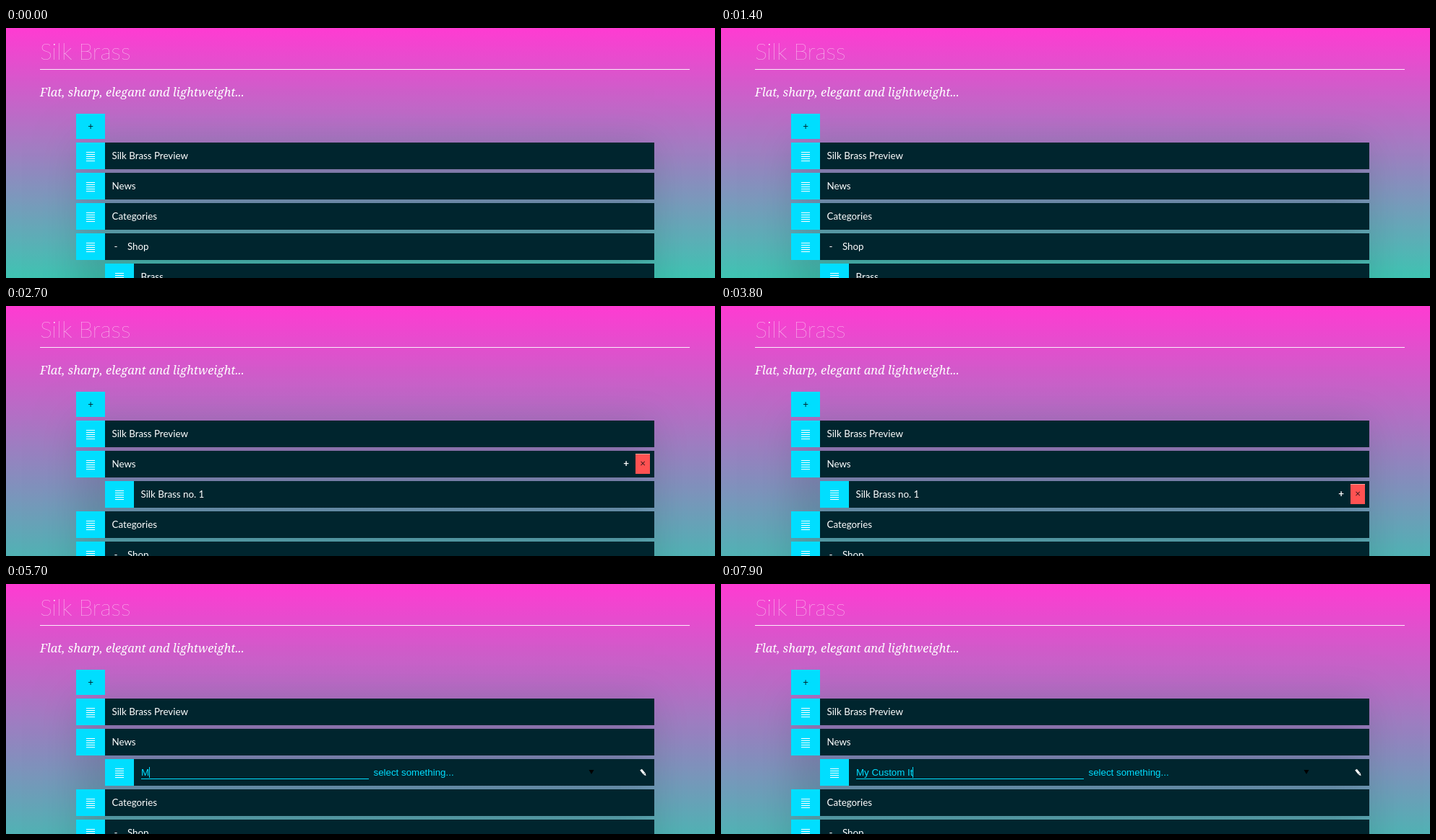
Recreate the animation shown at these times as an HTML page with a canvas. Size 981 px wide and 347 px high, loop 8 s.

```html
<!DOCTYPE html>
<html lang="en">
<head>
<meta charset="utf-8">
<title>Menu editor</title>
<style>
  html, body { margin: 0; width: 100%; height: 100%; overflow: hidden; background: #ff3bd2; }
  canvas { display: block; }
</style>
</head>
<body>
<canvas id="stage" width="981" height="347"></canvas>
<script>
const ctx = document.getElementById('stage').getContext('2d');
const W = 981, H = 347, LOOP = 8000;
const CYAN = '#00deff', DARK = '#00252e', WHITE = '#fff';
const ROW_TOP = 159, PITCH = 42, ROW_H = 37, RIGHT = 897;
const LABEL = '13.33px Lato, sans-serif';
const BOLD = 'bold 13.33px Lato, sans-serif';
const INPUT = '13.33px "Liberation Sans", Arial, sans-serif';
const NAME = 'Silk Brass', NEW_ITEM = NAME + ' no. 1';

// [time, typed characters]
const TYPED = 'My Custom It';
const KEYS = [[5700, 1], [6000, 2], [6300, 3], [6600, 4], [6800, 5], [7000, 6],
              [7200, 9], [7600, 10], [7800, 11], [7900, 12]];

// [from, to, row index]
const HOVERS = [[500, 1400, 0], [1500, 3700, 1], [3800, 4700, 2]];

function box(x, y, w, h, color) {
  ctx.fillStyle = color;
  ctx.fillRect(x, y, w, h);
}

function text(str, x, y, font, color, align = 'left') {
  ctx.font = font;
  ctx.fillStyle = color;
  ctx.textAlign = align;
  ctx.fillText(str, x, y);
}

function poly(points, color) {
  ctx.beginPath();
  points.forEach(([x, y]) => ctx.lineTo(x, y));
  ctx.fillStyle = color;
  ctx.fill();
}

function background(added) {
  const sky = ctx.createLinearGradient(0, 0, 0, H);
  sky.addColorStop(0, '#ff3bd2');
  sky.addColorStop(1, added ? '#50b2b4' : '#3ec4b2');
  box(0, 0, W, H, sky);
  // soft shade around the list
  ctx.save();
  ctx.shadowColor = 'rgba(0,0,0,.12)';
  ctx.shadowBlur = 50;
  ctx.shadowOffsetX = 2000;
  box(97 - 2000, ROW_TOP, 800, 400, '#000');
  ctx.restore();
}

function header() {
  text(NAME, 47, 44, '200 32px Lato, sans-serif', WHITE);
  box(47, 57, 899, 1, 'rgba(255,255,255,.9)');
  text('Flat, sharp, elegant and lightweight...', 47, 95,
       'italic 16.4px "Noto Serif", serif', WHITE);
  box(97, 119, 40, 35, CYAN);
  text('+', 117, 141, LABEL, DARK, 'center');
}

function row(index, { label, depth = 0, open = false }) {
  const x = 97 + depth * 40, y = ROW_TOP + index * PITCH;
  box(x, y, RIGHT - x, ROW_H, DARK);
  box(x, y, 40, ROW_H, CYAN);
  for (let i = 0; i < 5; i++) box(x + 14, y + 13 + i * 3, 12, 1, WHITE);
  if (open) text('-', x + 52.5, y + 23, LABEL, WHITE);
  text(label, x + (open ? 71 : 49.5), y + 23, LABEL, WHITE);
}

function buttons(index, pressed) {
  const y = ROW_TOP + index * PITCH + 4;
  if (pressed) {
    ctx.strokeStyle = '#17405a';
    ctx.lineWidth = 1;
    ctx.strokeRect(848.5, y + .5, 19, 27);
  }
  text('+', 858, y + 18, BOLD, WHITE, 'center');
  box(871, y, 20, 28, '#ff5252');
  box(871, y, 20, 1, '#ffa59a');
  text('×', 881, y + 18, LABEL, '#3a1a1e', 'center');
}

function editor(t) {
  box(187, 270, 315, 1, CYAN);
  ctx.font = INPUT;
  if (t < KEYS[0][0]) {
    box(187, 254, Math.floor(ctx.measureText(NEW_ITEM).width), 15, '#3399ff');
    text(NEW_ITEM, 187, 266, INPUT, WHITE);
  } else {
    const count = KEYS.filter(([at]) => t >= at).pop()[1];
    const typed = TYPED.slice(0, count);
    const caret = 187 + Math.round(ctx.measureText(typed).width);
    text(typed, 187, 266, INPUT, CYAN);
    box(caret, 254, 1, 15, CYAN);
  }
  text('select something...', 508.5, 266, INPUT, CYAN);
  poly([[806.5, 258], [813.5, 258], [810, 264]], '#000');
  // pencil
  poly([[877.2, 258.6], [879.8, 256.8], [884.6, 262.6], [885.6, 266.2], [882.2, 264.8]], WHITE);
  ctx.strokeStyle = DARK;
  ctx.lineWidth = .7;
  ctx.beginPath();
  ctx.moveTo(882, 264.4);
  ctx.lineTo(884.4, 262.4);
  ctx.stroke();
}

function draw(t) {
  const added = t >= 2700, editing = t >= 4700;
  const items = [
    { label: NAME + ' Preview' },
    { label: 'News' },
    { label: 'Categories' },
    { label: 'Shop', open: true },
    { label: 'Brass', depth: 1 }
  ];
  if (added) items.splice(2, 0, { label: editing ? '' : NEW_ITEM, depth: 1 });

  background(added);
  header();
  items.forEach((item, i) => row(i, item));
  const hover = HOVERS.find(([from, to]) => t >= from && t < to);
  if (hover) buttons(hover[2], t >= 2600 && t < 2700);
  if (editing) editor(t);
}

const start = performance.now();
function tick() {
  draw((performance.now() - start) % LOOP);
  requestAnimationFrame(tick);
}
tick();
</script>
</body>
</html>
```
